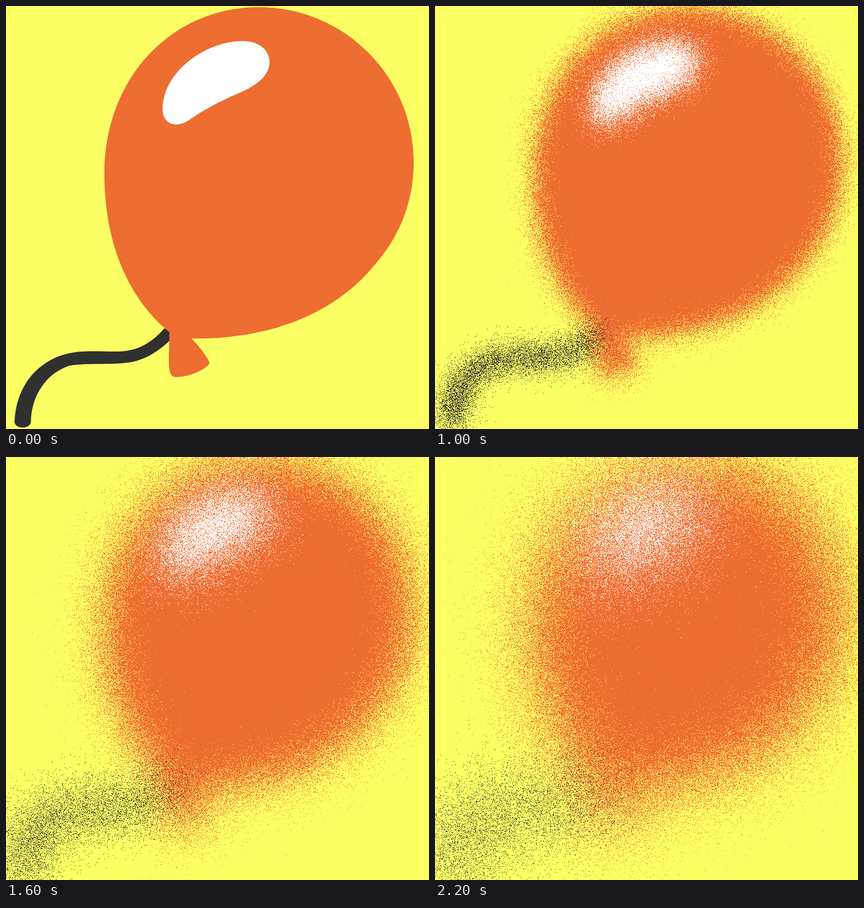
These frames come from a looping animation (748x748 px, 2300 ms). An HTML page with a canvas:

```html
<!DOCTYPE html>
<html lang="en">
<head>
<meta charset="utf-8">
<title>Dissolving balloon</title>
<style>
  html, body { margin: 0; width: 100%; height: 100%; overflow: hidden; background: #fbff64; }
  canvas { display: block; width: 100vw; height: 100vh; image-rendering: pixelated; }
</style>
</head>
<body>
<canvas id="stage" width="748" height="748"></canvas>
<script>
const SIZE = 748, STEP_MS = 100, STEPS = 23;
const BACKGROUND = '#fbff64';
const SHAPES = [
  ['#303030', 'M280 570C250 605 220 611 195 611C150 611 120 607 85 623C45 642 18 680 15 735' +
    'C16 749 43 749 44 735C45 690 70 650 112 636C150 630 190 636 225 629C258 621 278 602 289 592L292 575Z'],
  ['#ee6d30', 'M447 2C600 2 721 127 721 275C721 350 693 412 650 460C580 545 465 590 328 588' +
    'C344 604 356 621 360 631C358 640 325 657 300 656C288 656 288 640 288 620L289 577' +
    'C220 520 174 425 174 297C174 125 295 2 447 2Z'],
  ['#ffffff', 'M277 183C277 115 355 62 418 62C450 62 466 80 466 99C466 122 445 140 412 154' +
    'C370 172 345 187 325 201C300 218 277 208 277 183Z']
];

const ctx = document.getElementById('stage').getContext('2d', { willReadFrequently: true });
ctx.fillStyle = BACKGROUND;
ctx.fillRect(0, 0, SIZE, SIZE);
for (const [color, path] of SHAPES) {
  ctx.fillStyle = color;
  ctx.fill(new Path2D(path));
}

const clean = new Uint32Array(ctx.getImageData(0, 0, SIZE, SIZE).data.buffer);
const image = ctx.createImageData(SIZE, SIZE);
const pixels = new Uint32Array(image.data.buffer);
const empty = clean[SIZE - 1];

function randomSource(seed) {
  let s = seed | 0;
  return () => {
    s = s + 0x6d2b79f5 | 0;
    let t = Math.imul(s ^ s >>> 15, s | 1);
    t ^= t + Math.imul(t ^ t >>> 7, t | 61);
    return (t ^ t >>> 14) >>> 0;
  };
}

// Normally distributed values, picked at random for each pixel's offset
const uniform = randomSource(7);
const normals = Float32Array.from({ length: 65536 }, () => {
  const radius = Math.sqrt(-2 * Math.log((uniform() + 1) / 4294967297));
  return radius * Math.cos(2 * Math.PI * uniform() / 4294967296);
});

function scatter(step) {
  const spread = 0.92 * Math.pow(step, 1.29);
  const random = randomSource(step * 7919 + 1);
  for (let y = 0, i = 0; y < SIZE; y++) {
    for (let x = 0; x < SIZE; x++, i++) {
      const bits = random();
      const sx = Math.round(x + spread * normals[bits & 65535]);
      const sy = Math.round(y + spread * normals[bits >>> 16]);
      const inside = sx >= 0 && sx < SIZE && sy >= 0 && sy < SIZE;
      pixels[i] = inside ? clean[sy * SIZE + sx] : empty;
    }
  }
  ctx.putImageData(image, 0, 0);
}

let shown = -1;
const start = performance.now();

function render() {
  const elapsed = Math.max(0, performance.now() - start);
  const step = Math.floor(elapsed / STEP_MS) % STEPS;
  if (step !== shown) scatter(shown = step);
  requestAnimationFrame(render);
}
render();
</script>
</body>
</html>
```
